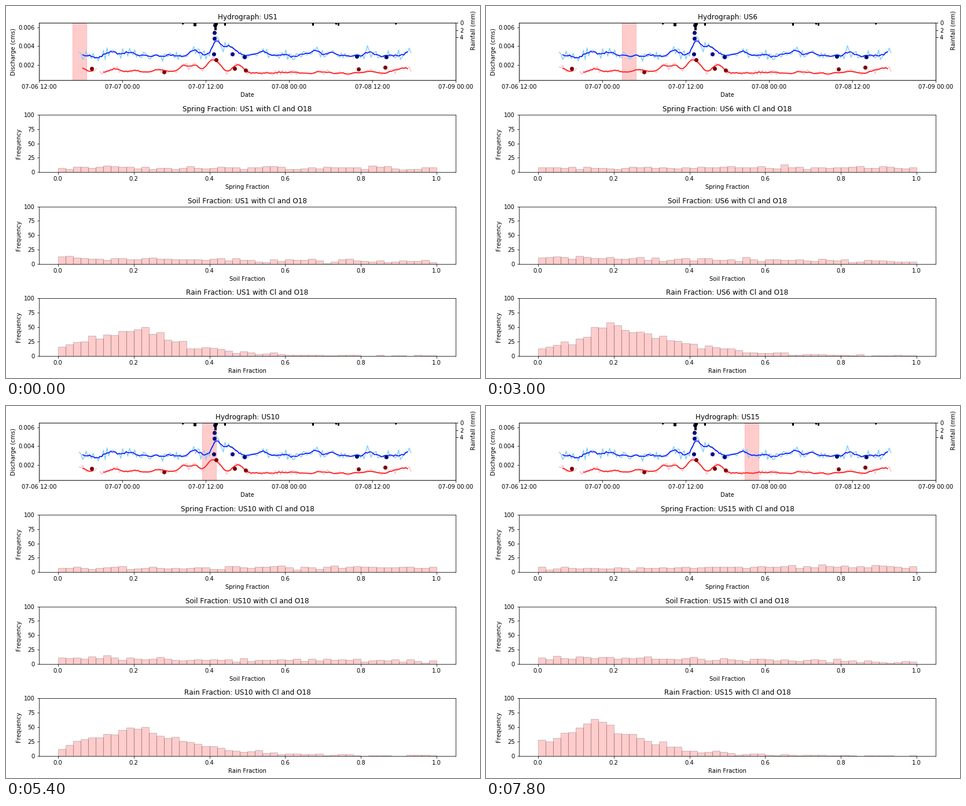
A matplotlib script that plays this animation: 819x643 px, repeating every 8 s.

```python
import numpy as np
import matplotlib.pyplot as plt
from matplotlib.animation import FuncAnimation

W, H, DPI = 819, 643, 72
LEFT, RIGHT = 57, 777
TOP, PANEL, PITCH = 29.2, 99.13, 158.75
BINS = 50

plt.rcParams.update({"font.family": "DejaVu Sans", "font.size": 10,
                     "text.kerning_factor": 6})

# Bumps on the flow curves: centre, rise and width in stage pixels.
BLUE = [(150, -7, 9), (181, 3, 5), (255, -5, 12), (292, -3, 12),
        (324, 8, 6), (365, 22, 6), (382, 16, 6), (441, 8, 5), (480, -2, 12),
        (520, 4, 16), (560, 3, 5), (597, -4, 14), (625, 5, 5), (675, -3, 8),
        (699, 4, 8)]
RED = [(130, 7, 6), (188, 6, 7), (265, 4, 6), (308, 14, 6), (327, 14, 6),
       (356, 23, 7), (369, 12, 5), (401, 18, 7), (543, 2, 8), (625, 4, 8),
       (687, 10, 11)]
BLUE_DOTS = [(361, 33), (360, 46), (360, 56), (359, 83),
             (391, 83), (412, 88), (606, 87), (657, 88)]
RED_DOTS = [(148, 108), (273, 114), (363, 93), (395, 108),
            (414, 111), (609, 109), (655, 106)]
# Centre, width and depth of the rain bars.
RAIN_BARS = [(305.5, 3, 3), (326.5, 5, 6), (362, 4, 13), (364.5, 3, 4),
             (378.5, 3, 5), (530.5, 3, 5), (570.5, 3, 3), (574.5, 3, 5),
             (673.5, 3, 3)]

# Key samples: left edge of the time window, first and last level of the
# spring and soil counts, then peak bin, height, rise and fall of the rain.
KEYS = {
    1: (115, 8, 7, 10, 5, 10, 47, 10.5, 7.6),
    3: (162, 9, 4, 5, 8, 4.5, 46, 8.6, 10),
    6: (235, 7, 9, 11, 5, 9, 55, 6, 10),
    7: (256, 3, 4, 3, 3, 13, 27, 15.5, 12),
    9: (321, 7, 9, 11, 5, 8, 55, 8, 8.3),
    12: (374, 7, 8, 9, 5, 12, 48, 8.2, 10),
    15: (447, 7, 10, 12, 4, 7, 60, 6.7, 8),
}
SAMPLES = [n for n in range(1, 16) if n != 11]


def settings(n):
    return [np.interp(n, list(KEYS), col) for col in zip(*KEYS.values())]


def rain_curve(peak, height, rise, fall):
    d = np.arange(BINS) - peak
    width = np.where(d < 0, rise, fall)
    return height * np.exp(-(np.abs(d) / width) ** 1.2)


def sample(n):
    x, spring0, spring1, soil0, soil1, *rain = settings(n)
    rng = np.random.default_rng(100 + n)
    means = [np.linspace(spring0, spring1, BINS),
             np.linspace(soil0, soil1, BINS),
             rain_curve(*rain) + 0.8]
    noisy = [m + rng.normal(0, 0.6, BINS) * np.sqrt(m) for m in means]
    return x, [np.clip(np.round(v), 0, None) for v in noisy]


def add_axes(row):
    top = TOP + row * PITCH
    return fig.add_axes([LEFT / W, 1 - (top + PANEL) / H,
                         (RIGHT - LEFT) / W, PANEL / H])


def flow(ax, base, bumps, color, pale, spread, seed, gap=None):
    rng = np.random.default_rng(seed)
    x = np.arange(126.5, 702, 3)
    raw = base + np.clip(rng.normal(0, spread, x.size),
                         -2 * spread, 2 * spread)
    for centre, rise, width in bumps:
        raw -= rise * np.exp(-((x - centre) / width) ** 2 / 2)
    if gap:
        raw[(x > gap[0]) & (x < gap[1])] = np.nan
    ax.plot(x, raw, color=pale)
    ax.plot(x[2:-2], np.convolve(raw, np.ones(5) / 5, "valid"), color=color)


def hydrograph():
    # Plotted directly in stage pixels; the tick labels carry the units.
    ax = add_axes(0)
    flow(ax, 83, BLUE, "blue", "lightskyblue", 5, 4)
    flow(ax, np.linspace(113, 116.5, 192), RED, "red", "pink", 2.4, 9,
         gap=(158, 161))
    ax.plot(*zip(*BLUE_DOTS), "o", color="navy")
    ax.plot(*zip(*RED_DOTS), "o", color="maroon")
    ax.set_xlim(LEFT, RIGHT)
    ax.set_ylim(TOP + PANEL, TOP)
    ax.set_xticks(range(LEFT, RIGHT + 1, 144),
                  ["07-06 12:00", "07-07 00:00", "07-07 12:00",
                   "07-08 00:00", "07-08 12:00", "07-09 00:00"])
    ax.set_yticks([37, 69.25, 101.5], ["0.006", "0.004", "0.002"])
    ax.set_xlabel("Date")
    ax.set_ylabel("Discharge (cms)")

    rain = ax.twinx()
    x, width, depth = zip(*RAIN_BARS)
    rain.bar(x, depth, width, bottom=TOP, color="black")
    rain.set_xlim(LEFT, RIGHT)
    rain.set_ylim(TOP + PANEL, TOP)
    rain.set_yticks([TOP, TOP + 12.4, TOP + 24.8], ["0", "2", "4"])
    rain.set_ylabel("Rainfall (mm)", y=0.875, labelpad=12)
    return ax


def fraction_panel(name, row):
    ax = add_axes(row)
    bars = ax.bar(np.arange(BINS) / BINS, np.zeros(BINS), 1 / BINS,
                  align="edge", color="red", edgecolor="black",
                  linewidth=1, alpha=0.2)
    ax.set_xlim(-0.05, 1.05)
    ax.set_ylim(0, 100)
    ax.set_xticks(np.linspace(0, 1, 6))
    ax.set_yticks(range(0, 101, 25))
    ax.set_xlabel(f"{name} Fraction")
    ax.set_ylabel("Frequency")
    return name, ax, bars


fig = plt.figure(figsize=(W / DPI, H / DPI), dpi=DPI, facecolor="white")
hydro = hydrograph()
band = hydro.add_patch(plt.Rectangle((LEFT, TOP), 24, PANEL, color="red",
                                     alpha=0.2, linewidth=1))
panels = [fraction_panel(name, row)
          for row, name in enumerate(["Spring", "Soil", "Rain"], 1)]


def draw(i):
    # Each sample holds for three ticks of 200 ms.
    n = SAMPLES[i // 3]
    x, histograms = sample(n)
    band.set_x(x)
    hydro.set_title(f"Hydrograph: US{n}")
    for (name, ax, bars), heights in zip(panels, histograms):
        ax.set_title(f"{name} Fraction: US{n} with Cl and O18")
        for bar, height in zip(bars, heights):
            bar.set_height(height)
    return []


anim = FuncAnimation(fig, draw, frames=40, interval=200, repeat=True,
                     repeat_delay=0, init_func=lambda: draw(0))
plt.show()
```
